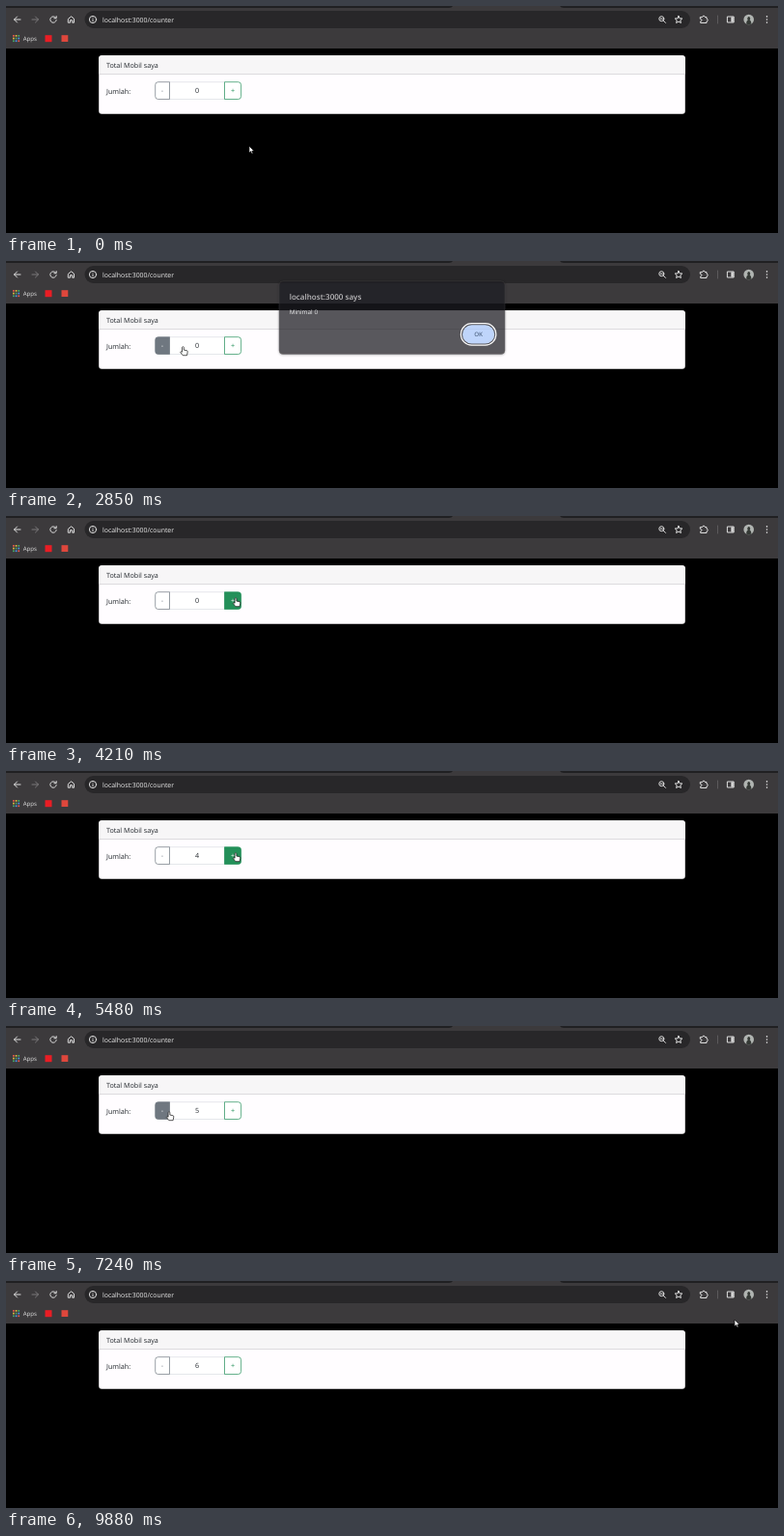
An HTML page that plays this animation: 800x235 px, repeating every 9.97 s.

```html
<!DOCTYPE html>
<html lang="id">
<head>
<meta charset="utf-8">
<title>Counter</title>
<style>
  html, body { margin: 0; width: 100%; height: 100%; overflow: hidden; background: #000; }
  svg { display: block; width: 800px; height: 235px; }
  text { font-family: "Open Sans", "Noto Sans", sans-serif; text-rendering: geometricPrecision; white-space: pre; }
  .page { font-size: 7.2px; fill: #24292e; }
  .mid { text-anchor: middle; }
  .icon { fill: none; stroke: #dedede; stroke-linecap: round; stroke-linejoin: round; }
  .btn { fill: #fff; stroke: var(--c); stroke-width: .7; }
  .sign { fill: var(--c); }
  .on .btn { fill: var(--c); }
  .on .sign { fill: #fff; }
  #minus { --c: #6f7780; }
  #plus { --c: #239059; }
  #cursor path { fill: #fff; stroke: #111; stroke-width: .7; stroke-linejoin: round; }
</style>
</head>
<body>
<svg viewBox="0 0 800 235">
  <defs>
    <filter id="shadow" x="-5%" y="-10%" width="110%" height="125%">
      <feDropShadow dx="0" dy=".5" stdDeviation=".8" flood-opacity=".4"/>
    </filter>
  </defs>

  <!-- browser window -->
  <rect width="800" height="44" fill="#3c3a3c"/>
  <path d="M0 0H463Q462 2 459 2H0ZM574 0H800V2H578Q575 2 574 0Z" fill="#202022"/>
  <rect x="81.5" y="5" width="627.5" height="18" rx="9" fill="#282729"/>
  <g class="icon">
    <path d="M15 14H8.5M11.5 11L8.5 14L11.5 17"/>
    <path d="M27 14H33.500M30.500 11L33.500 14L30.500 17" stroke="#7b797b"/>
    <path d="M51.500 12A3.200 3.200 0 1 0 52.200 14.600M52.200 10.600V12.700H50"/>
    <path d="M64.700 13.200L67.600 10.800L70.500 13.200V17.200H68.700V14.700H66.500V17.200H64.700Z"/>
    <circle cx="90" cy="14" r="3.6"/>
    <path d="M90 13.8V15.800M90 12.100V12.200"/>
    <circle cx="679.3" cy="13.2" r="2.5"/>
    <path d="M681.200 15.100L683.500 17.400M678.200 13.200H680.400"/>
    <path d="M697 10.300L698.100 12.800L700.800 13L698.800 14.800L699.400 17.500L697 16.100L694.600 17.500L695.200 14.800L693.200 13L695.900 12.800Z"/>
    <path d="M719.700 11.500H721.700A1.300 1.300 0 0 1 724.300 11.500H726V13.300A1.300 1.300 0 0 1 726 15.900V17.500H719.700V15.900A1.300 1.300 0 0 0 719.700 13.300Z"/>
    <rect x="747.8" y="11" width="6.4" height="6"/>
    <path d="M752.600 11.400V16.600" stroke-width="2.4" stroke-linecap="butt"/>
    <path d="M737.500 10V18" stroke="#656365" stroke-width=".8"/>
  </g>
  <circle cx="769.7" cy="14" r="5.3" fill="#b0b4b1"/>
  <path d="M767 18.400Q767.200 15 768.800 14.400A1.500 1.900 0 1 1 770.700 14.400Q772.300 15 772.500 18.400Q769.700 20 767 18.400Z" fill="#353a36"/>
  <path d="M788.500 10.900V17.200" stroke="#dedede" stroke-width="1.6" stroke-linecap="round" stroke-dasharray="0 3.1"/>
  <text x="100" y="16.6" font-size="6.9" fill="#ececec">localhost:3000/counter</text>
  <g id="apps"></g>
  <text x="17.7" y="35.8" font-size="6.1" fill="#e3e3e3">Apps</text>
  <rect x="40.5" y="30.2" width="7" height="7" fill="#e91d24"/>
  <rect x="57.5" y="30.2" width="6.8" height="6.8" fill="#df473c"/>

  <!-- card -->
  <rect x="96.2" y="51.2" width="607.6" height="60.6" rx="3" fill="#fffdff"/>
  <path d="M96.2 70.500V54.200Q96.200 51.200 99.200 51.200H700.800Q703.800 51.200 703.800 54.200V70.500Z" fill="#f7f6f7"/>
  <path d="M96.200 70.600H703.800" stroke="#d2d1d3" stroke-width=".8"/>
  <text class="page" x="104" y="63.7">Total Mobil saya</text>
  <text class="page" x="104" y="90.5">Jumlah:</text>
  <rect x="169.5" y="78.8" width="57" height="17.6" fill="#fff" stroke="#dee2e6" stroke-width=".8"/>
  <text class="page mid" id="value" x="198" y="90.3">0</text>
  <g id="minus">
    <path class="btn" d="M169.500 78.700V96.500H157.700Q154.700 96.500 154.700 93.500V81.700Q154.700 78.700 157.700 78.700Z"/>
    <text class="page mid sign" x="162" y="90.1">-</text>
  </g>
  <g id="plus">
    <path class="btn" d="M226.500 78.700V96.500H240.600Q243.600 96.500 243.600 93.500V81.700Q243.600 78.700 240.600 78.700Z"/>
    <text class="page mid sign" x="235" y="90.3">+</text>
  </g>

  <!-- alert -->
  <g id="alert">
    <rect x="283" y="23" width="234" height="75.6" rx="4" fill="#1f1d20" stroke="#434144" stroke-width=".5" filter="url(#shadow)"/>
    <text x="293.7" y="42.2" font-size="8.05" font-weight="600" fill="#ececee">localhost:3000 says</text>
    <text x="293.7" y="57.4" font-size="6.4" fill="#e8e8ea">Minimal 0</text>
    <rect id="ring" x="471.4" y="66.9" width="36.4" height="22.4" rx="11.2" fill="none" stroke="#fff" stroke-width="1.2"/>
    <rect x="473" y="68.5" width="33.2" height="19.3" rx="9.65" fill="#a8c7fa"/>
    <text class="mid" x="489.6" y="80.4" font-size="6.2" font-weight="600" fill="#17345f">OK</text>
  </g>

  <g id="cursor">
    <path id="arrow" d="M0 0V7L1.600 5.500L2.700 8L3.900 7.500L2.800 5.100H5Z"/>
    <path id="hand" d="M-.9 .8Q0 -.6 .9 .8V3.600L4 4.200Q5 4.500 4.800 5.600L4.100 9.200H-.2L-2.700 5.900Q-2.600 4.700 -.9 5.700Z"/>
  </g>
</svg>
<script>
  const LOOP = 9970;
  const OPEN = 2760, CLOSE = 3910;
  const $ = id => document.getElementById(id);

  const MINUS = { x: 169, y: 88.5 };
  const PLUS = { x: 238, y: 84.5 };
  const OK = { x: 483, y: 89 };

  // The pointer reaches each spot at "at" and rests there until "until".
  const stops = [
    { x: 252, y: 145, at: 0, until: 30 },
    { x: 316, y: 223, at: 1250 },
    { x: 195, y: 118, at: 1910 },
    { ...MINUS, at: 2400, until: 2710 },
    { ...OK, at: 3800, until: 3900 },
    { ...PLUS, at: 4140, until: 6250 },
    { ...MINUS, at: 6650, until: 7500 },
    { ...PLUS, at: 7900, until: 8600 },
    { x: 768, y: 46, at: 9200 },
    { x: 755, y: 40, at: 9880 }
  ];

  // Each burst of clicks adds "by" at a steady pace.
  const bursts = [
    { from: 4600, every: 255, clicks: 7, by: 1 },
    { from: 6840, every: 280, clicks: 3, by: -1 },
    { from: 8090, every: 400, clicks: 2, by: 1 }
  ];

  const clamp = (v, max = 1) => Math.max(0, Math.min(max, v));
  const ease = v => v * v * (3 - 2 * v);

  function pointer(t) {
    const i = stops.findLastIndex(s => s.at <= t);
    const a = stops[i], b = stops[i + 1] || a;
    const leave = a.until || a.at;
    const p = ease(clamp((t - leave) / (b.at - leave || 1)));
    return { x: a.x + (b.x - a.x) * p, y: a.y + (b.y - a.y) * p };
  }

  const count = t => bursts.reduce((sum, b) =>
    sum + b.by * clamp(Math.floor((t - b.from) / b.every) + 1, b.clicks), 0);

  const show = (id, visible) => $(id).setAttribute("visibility", visible ? "visible" : "hidden");

  function draw(t) {
    const { x, y } = pointer(t);
    const asking = t >= OPEN && t < CLOSE + 80;
    const inRow = y > 78 && y < 97 && !asking;
    const onMinus = inRow && x > 154 && x < 171;
    const onPlus = inRow && x > 226 && x < 244;
    const hand = onMinus || onPlus || (asking && t < OPEN + 140);

    $("value").textContent = count(t);
    $("minus").classList.toggle("on", onMinus || asking);
    $("plus").classList.toggle("on", onPlus);

    const shown = clamp((t - OPEN) / 125) * (1 - clamp((t - CLOSE) / 80));
    $("alert").setAttribute("opacity", shown);
    $("alert").setAttribute("transform", `translate(0 ${-8 * (1 - shown)})`);
    show("ring", asking && t < 3500);

    show("hand", hand);
    show("arrow", !hand);
    $("cursor").setAttribute("transform", `translate(${x.toFixed(2)} ${y.toFixed(2)})`);
  }

  const hues = ["#e8594d", "#e6b93e", "#45a866", "#5292e8"];
  for (let i = 0; i < 9; i++) {
    const col = i % 3, row = Math.floor(i / 3);
    $("apps").innerHTML += `<rect x="${7 + col * 2.7}" y="${30 + row * 2.7}" width="1.7" height="1.7" fill="${hues[(col + row) % 4]}"/>`;
  }

  const start = performance.now();
  function tick() {
    draw((performance.now() - start) % LOOP);
    requestAnimationFrame(tick);
  }
  tick();
</script>
</body>
</html>
```
